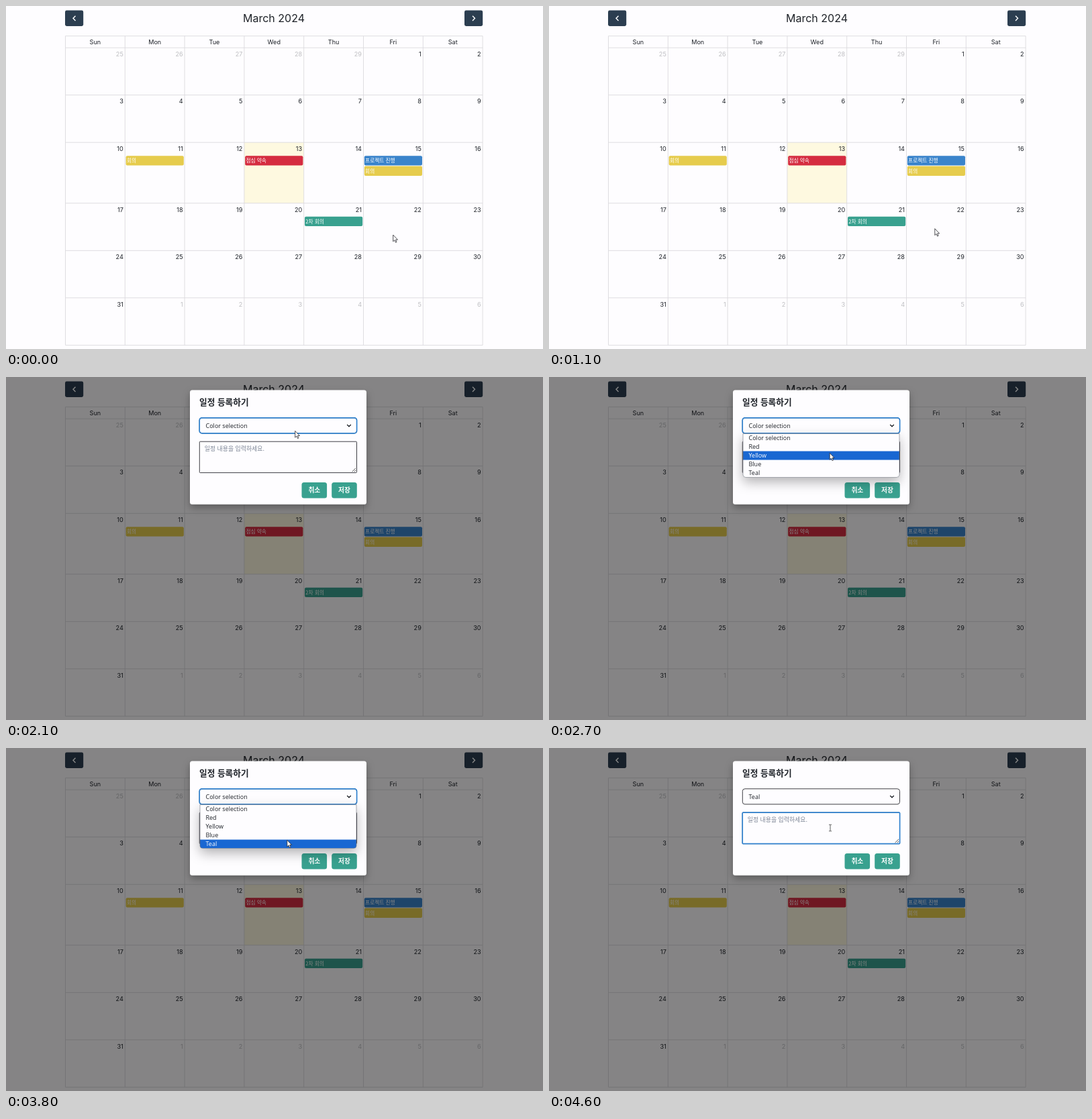
An HTML page that plays this animation: 800 px wide and 511 px high, repeating every 5000 ms.

```html
<!DOCTYPE html>
<html lang="ko">
<head>
<meta charset="utf-8">
<title>Calendar</title>
<style>
  html, body { margin: 0; width: 100%; height: 100%; overflow: hidden; background: #fefdff; }
  svg { display: block; width: 100%; height: 100%; }
  text { font-family: Inter, "Noto Sans CJK KR", sans-serif; fill: #1f2329; white-space: pre; }
  .ui { font-family: "Open Sans", "Noto Sans CJK KR", sans-serif; font-size: 9px; }
  .ko { font-family: "Noto Sans CJK KR", "Noto Sans CJK", sans-serif; }
</style>
</head>
<body>
<svg id="stage" viewBox="0 0 800 511" xmlns="http://www.w3.org/2000/svg"></svg>
<script>
const NS = 'http://www.w3.org/2000/svg';
const stage = document.getElementById('stage');

function add(parent, tag, attrs = {}, content) {
  const el = document.createElementNS(NS, tag);
  for (const k in attrs) el.setAttribute(k, attrs[k]);
  if (content !== undefined) el.textContent = content;
  return parent.appendChild(el);
}
const group = (parent, attrs) => add(parent, 'g', attrs);
const box = (parent, x, y, width, height, attrs) =>
  add(parent, 'rect', { x, y, width, height, ...attrs });
const label = (parent, x, y, str, attrs) => add(parent, 'text', { x, y, ...attrs }, str);
const line = (parent, d, stroke, width) =>
  add(parent, 'path', { d, fill: 'none', stroke, 'stroke-width': width });
const show = (el, on) => el.setAttribute('visibility', on ? 'visible' : 'hidden');

const WHITE = '#fefdff', TEAL = '#39a18f', FOCUS = '#3182ce';
const LEFT = 88.5, COL = 88.8, RIGHT = LEFT + COL * 7;
const ROWS = [62.2, 132.6, 203.2, 293.8, 364.4, 434.8, 505.3];
const colX = c => LEFT + c * COL;

// Soft shadows
const defs = add(stage, 'defs');
for (const [id, dy, blur, alpha] of [['modalShadow', 5, 6, .3], ['menuShadow', 7, 9, .3]]) {
  const f = add(defs, 'filter', { id, x: '-30%', y: '-60%', width: '160%', height: '240%' });
  add(f, 'feDropShadow', { dx: 0, dy, stdDeviation: blur, 'flood-opacity': alpha });
}

function drawCalendar() {
  const g = group(stage);
  box(g, 0, 0, 800, 511, { fill: WHITE });
  for (const [x, d] of [[88, 'M103.5 14.7L100 18.3L103.5 21.9'], [683, 'M695 14.7L698.5 18.3L695 21.9']]) {
    box(g, x, 6.5, 27.2, 23.5, { rx: 2.4, fill: '#2c3e50' });
    line(g, d, '#fff', 1.4);
  }
  label(g, 399, 24, 'March 2024', { 'font-size': 16, 'text-anchor': 'middle' });

  box(g, colX(3), ROWS[2], COL, ROWS[3] - ROWS[2], { fill: '#fef9e0' });
  for (const y of [44.7, ...ROWS]) line(g, `M${LEFT} ${y}H${RIGHT}`, '#dcdbde', .9);
  for (let c = 0; c < 8; c++) line(g, `M${colX(c)} 44.7V${ROWS[6]}`, '#dcdbde', .9);

  'Sun Mon Tue Wed Thu Fri Sat'.split(' ').forEach((name, c) =>
    label(g, colX(c + .5), 56.5, name, { 'font-size': 9.1, 'text-anchor': 'middle' }));

  const first = new Date(2024, 1, 25);
  for (let i = 0; i < 42; i++) {
    const day = new Date(2024, 1, first.getDate() + i);
    label(g, colX(i % 7 + 1) - 2.5, ROWS[i / 7 | 0] + 12.8, day.getDate(),
      { 'font-size': 9.1, 'text-anchor': 'end', opacity: day.getMonth() === 2 ? 1 : .28 });
  }

  const events = [
    [1, 2, 0, '#e6cc4d', '회의'],
    [3, 2, 0, '#d52c40', '점심 약속'],
    [5, 2, 0, '#3a84cb', '프로젝트 진행'],
    [5, 2, 1, '#e6cc4d', '회의'],
    [4, 3, 0, TEAL, '2차 회의'],
  ];
  for (const [c, r, slot, fill, name] of events) {
    const x = colX(c) + 1.3, y = ROWS[r] + 20 + slot * 15.4;
    box(g, x, y, 86.2, 14.3, { rx: 2, fill });
    label(g, x + 1.3, y + 9.9, name,
      { class: 'ko', 'font-size': 7.7, 'font-weight': 500, style: 'fill:#fff' });
  }
}

function field(parent, y, h, rx) {
  box(parent, 288.3, y, 234.2, h, { rx, fill: WHITE, stroke: '#2a2a30', 'stroke-width': .9 });
  return box(parent, 288.2, y, 234.4, h, { rx, fill: 'none', stroke: FOCUS, 'stroke-width': 1.7 });
}

function drawModal() {
  const g = group(stage);
  box(g, 0, 0, 800, 511, { fill: '#000', opacity: .48 });
  box(g, 274, 19.4, 263, 170.4, { rx: 3.5, fill: WHITE, filter: 'url(#modalShadow)' });
  label(g, 288, 42, '일정 등록하기', { class: 'ko', 'font-size': 12.7, 'font-weight': 600 });

  const selectRing = field(g, 60.8, 23, 3.6);
  const value = label(g, 297.5, 75.8, '', { class: 'ui' });
  line(g, 'M508.2 70.9L511 73.7L513.8 70.9', '#1f2329', 1.4);

  const areaRing = field(g, 96.2, 46.4, 1);
  label(g, 295.8, 109.8, '일정 내용을 입력하세요.',
    { class: 'ko', 'font-size': 8.9, style: 'fill:#7b8494' });
  line(g, 'M515.6 141.2L521 135.8M518.8 141.2L521 139', '#444', .9);

  for (const [x, name] of [[440.5, '취소'], [485.2, '저장']]) {
    box(g, x, 157, 37.6, 23.4, { rx: 3.5, fill: TEAL });
    label(g, x + 18.8, 172.2, name,
      { class: 'ko', 'font-size': 9.7, 'font-weight': 700, 'text-anchor': 'middle', style: 'fill:#fff' });
  }
  return { g, selectRing, areaRing, value };
}

const MENU_TOP = 84.5, ROW_H = 13;
function drawMenu() {
  const g = group(stage);
  const shape = 'M289 84.5H522V145.5Q522 149.5 518 149.5H293Q289 149.5 289 145.5Z';
  add(add(defs, 'clipPath', { id: 'menuClip' }), 'path', { d: shape });
  add(g, 'path', { d: shape, fill: WHITE, filter: 'url(#menuShadow)' });
  const bar = box(group(g, { 'clip-path': 'url(#menuClip)' }), 289, 0, 233, ROW_H, { fill: '#1967d2' });
  line(g, shape, '#70757d', .6);
  const items = ['Color selection', 'Red', 'Yellow', 'Blue', 'Teal'].map((name, i) =>
    label(g, 297.5, MENU_TOP + i * ROW_H + 9.9, name, { class: 'ui' }));
  return { g, bar, items };
}

drawCalendar();
const modal = drawModal();
const menu = drawMenu();
const arrow = add(stage, 'path', {
  d: 'M0 0V9.8L2.2 7.8L3.8 11.3L5.3 10.6L3.8 7.2H6.8Z',
  fill: '#fff', stroke: '#25252b', 'stroke-width': .8, 'stroke-linejoin': 'round',
});
const beam = line(stage, 'M-2 -4.8H-.6L0 -4.3L.6 -4.8H2M0 -4.3V4.3M-2 4.8H-.6L0 4.3L.6 4.8H2', '#333', .8);

// Pointer path: time, x, y
const PATH = [
  [0, 576.7, 341], [1100, 574.8, 331.7], [1500, 575, 331], [2000, 431, 81],
  [2100, 430.7, 80.3], [2400, 430.7, 80.3], [2700, 418.2, 113.3], [3000, 418, 120],
  [3200, 417.7, 123], [3400, 417.7, 123], [3600, 418.2, 131], [3700, 418.2, 131],
  [3800, 418.8, 137.2], [3900, 419, 136], [4300, 419, 119], [5000, 419, 119],
];
const LOOP = 5000, OPEN = 1500, DROP = 2400, PICK = 3900, REFOCUS = 4500;

function pointer(t) {
  const i = PATH.findIndex(p => p[0] > t);
  const [t0, x0, y0] = PATH[i - 1], [t1, x1, y1] = PATH[i];
  const u = (t - t0) / (t1 - t0), e = u * u * (3 - 2 * u);
  return [x0 + (x1 - x0) * e, y0 + (y1 - y0) * e];
}

function draw(now) {
  const t = Math.floor(now % LOOP / 100) * 100;
  const [x, y] = pointer(t);
  show(modal.g, t >= OPEN);
  show(menu.g, t >= DROP && t < PICK);

  const row = Math.max(0, Math.min(4, Math.floor((y - MENU_TOP) / ROW_H)));
  menu.bar.setAttribute('y', MENU_TOP + row * ROW_H);
  menu.items.forEach((el, i) => el.style.fill = i === row ? '#fff' : '#1f2329');
  modal.value.textContent = t < PICK ? 'Color selection' : 'Teal';

  const focus = t < REFOCUS ? 0 : t === REFOCUS ? .5 : 1;
  modal.selectRing.setAttribute('opacity', 1 - focus);
  modal.areaRing.setAttribute('opacity', focus);

  const typing = t >= PICK;
  show(arrow, !typing);
  show(beam, typing);
  (typing ? beam : arrow).setAttribute('transform', `translate(${x} ${y})`);
}

const start = performance.now();
function tick() {
  draw(performance.now() - start);
  requestAnimationFrame(tick);
}
tick();
</script>
</body>
</html>
```
